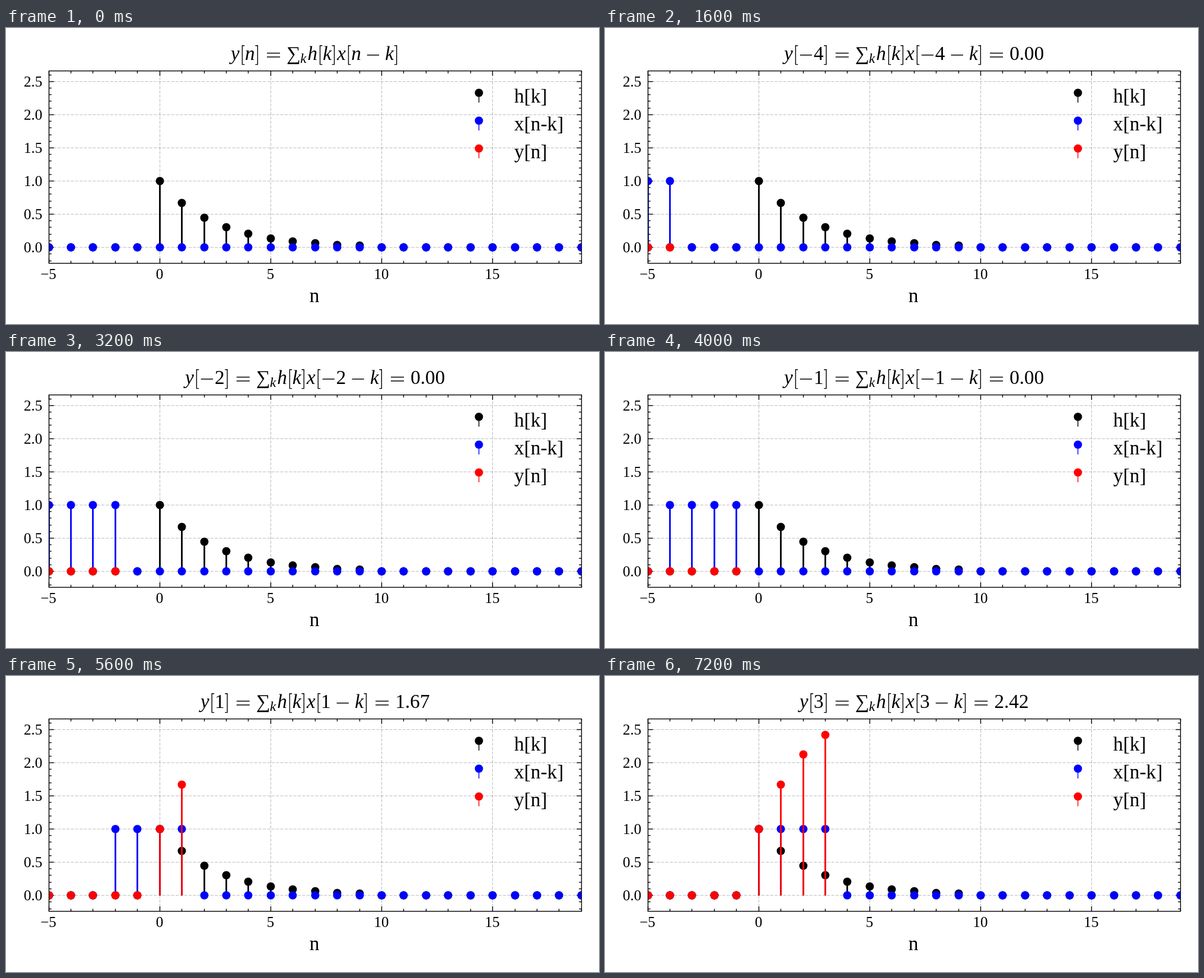
Animation of 1000x500 px, one loop 8 s. Source, as an HTML page:

```html
<!DOCTYPE html>
<html lang="en">
<head>
<meta charset="utf-8">
<title>Discrete convolution</title>
<style>
html, body { margin: 0; width: 100%; height: 100%; overflow: hidden; background: #fff; }
svg { display: block; width: 1000px; height: 500px; font-family: "Liberation Serif", "Times New Roman", serif; }
</style>
</head>
<body>
<svg id="stage" viewBox="0 0 1000 500"></svg>
<script>
const NS = "http://www.w3.org/2000/svg";
const stage = document.getElementById("stage");
const STEP = 800, STEPS = 10, FIRST = -5, LAST = 19;
const BOX = { left: 72.5, right: 970.5, top: 72.5, bottom: 397.5 };
const BLACK = "#000", BLUE = "#00f", RED = "#f00";

function add(parent, tag, attrs, text) {
  const node = document.createElementNS(NS, tag);
  for (const key in attrs) node.setAttribute(key, attrs[key]);
  if (text !== undefined) node.textContent = text;
  parent.appendChild(node);
  return node;
}
const line = (parent, x1, y1, x2, y2, stroke, width, more) =>
  add(parent, "line", { x1, y1, x2, y2, stroke, "stroke-width": width, ...more });
const label = (parent, x, y, size, text, more) =>
  add(parent, "text", { x, y, "font-size": size, ...more }, text);
const dot = (parent, x, y, fill) => add(parent, "circle", { cx: x, cy: y, r: 6.95, fill });

// Data coordinates snapped to pixel centres
const px = n => Math.floor(72.1 + 37.43 * (n - FIRST)) + 0.5;
const py = v => Math.floor(370.6 - 112.1 * v) + 0.5;

// Signals
const h = k => (k >= 0 && k < 10 ? Math.exp(-0.4 * k) : 0);
const x = m => (m >= 0 && m < 4 ? 1 : 0);
function y(n) {
  let sum = 0;
  for (let k = 0; k < 10; k++) sum += h(k) * x(n - k);
  return sum;
}

function stems(group, value, last, color) {
  group.replaceChildren();
  for (let n = FIRST; n <= last; n++)
    if (value(n) > 0) line(group, px(n), py(0), px(n), py(value(n)), color, 2.78);
  for (let n = FIRST; n <= last; n++) dot(group, px(n), py(value(n)), color);
}

function drawGrid() {
  const dash = { "stroke-dasharray": "5.14 2.22", "stroke-opacity": 0.25 };
  for (let n = 0; n <= 15; n += 5) line(stage, px(n), BOX.bottom, px(n), BOX.top, BLACK, 1.1, dash);
  for (let i = 0; i <= 5; i++) line(stage, BOX.left, py(i / 2), BOX.right, py(i / 2), BLACK, 1.1, dash);
}

function drawTicks() {
  for (let n = FIRST; n <= LAST; n++) {
    const major = n % 5 === 0, len = major ? 8.3 : 4.2;
    line(stage, px(n), BOX.bottom, px(n), BOX.bottom - len, BLACK, 1.39);
    line(stage, px(n), BOX.top, px(n), BOX.top + len, BLACK, 1.39);
    if (major) label(stage, px(n) - (n < 0 ? 1 : 0.5), 424, 25, String(n).replace("-", "\u2212"), { "text-anchor": "middle" });
  }
  for (let i = -2; i <= 26; i++) {
    const major = i % 5 === 0, len = major ? 8.3 : 4.2, at = py(i / 10);
    line(stage, BOX.left, at, BOX.left + len, at, BLACK, 1.39);
    line(stage, BOX.right, at, BOX.right - len, at, BLACK, 1.39);
    if (major && i >= 0) label(stage, 61.2, at + 8, 25, (i / 10).toFixed(1), { "text-anchor": "end" });
  }
}

function drawLegend() {
  [["h[k]", BLACK], ["x[n-k]", BLUE], ["y[n]", RED]].forEach(([text, color], i) => {
    const at = 109.5 + 47 * i;
    line(stage, 797.5, at, 797.5, at + 16.5, color, 1.39);
    dot(stage, 797.5, at, color);
    label(stage, 857, 125.5 + 47 * i, 33.33, text);
  });
}

// Title typesetting: advances in em
const EM = 33.2, BASE = 54;
const ADVANCE = { y: 0.444, k: 0.444, x: 0.444, h: 0.5, n: 0.5, "[": 0.278, "]": 0.278,
  "=": 1.334, "\u2212": 0.778, "~": 1.222, S: 0.64, _: 0.42, ".": 0.25 };
const advance = c => (ADVANCE[c] || 0.5) * EM;

function glyph(group, c, at) {
  const bar = (from, to, up) =>
    line(group, at + from * EM, BASE - up * EM, at + to * EM, BASE - up * EM, BLACK, 1.5);
  const italic = { "font-style": "italic" };
  if (c === "[" || c === "]") {
    const [stem, tip] = c === "[" ? [0.138, 0.255] : [0.14, 0.023];
    add(group, "path", {
      d: `M${at + tip * EM} ${BASE - 0.73 * EM}H${at + stem * EM}V${BASE + 0.23 * EM}H${at + tip * EM}`,
      fill: "none", stroke: BLACK, "stroke-width": 1.4
    });
  } else if (c === "=") {
    bar(0.334, 1, 0.347);
    bar(0.334, 1, 0.153);
  } else if (c === "\u2212") bar(0.083, 0.694, 0.25);
  else if (c === "~") bar(0.305, 0.916, 0.25);
  else if (c === "S") label(group, at, BASE, EM, "\u2211");
  else if (c === "_") label(group, at + 1.8, BASE + 5, EM * 0.7, "k", italic);
  else label(group, at, BASE, EM, c, /[a-z]/.test(c) ? italic : {});
}

function drawTitle(group, n) {
  const name = n === null ? "n" : String(n).replace("-", "\u2212");
  const result = n === null ? "" : "=" + y(n).toFixed(2);
  const chars = [..."y[" + name + "]=S_h[k]x[" + name + "~k]" + result];
  let at = 521.2 - chars.reduce((sum, c) => sum + advance(c), 0) / 2;
  group.replaceChildren();
  for (const c of chars) {
    glyph(group, c, at);
    at += advance(c);
  }
}

add(add(stage, "clipPath", { id: "plot" }), "rect",
  { x: BOX.left, y: BOX.top, width: BOX.right - BOX.left, height: BOX.bottom - BOX.top });
drawGrid();
drawTicks();
const plot = add(stage, "g", { "clip-path": "url(#plot)" });
const [hLayer, xLayer, yLayer] = [0, 1, 2].map(() => add(plot, "g", {}));
stems(hLayer, h, LAST, BLACK);
add(stage, "rect", { x: BOX.left, y: BOX.top, width: BOX.right - BOX.left, height: BOX.bottom - BOX.top,
  fill: "none", stroke: BLACK, "stroke-width": 1.39 });
drawLegend();
label(stage, 520, 463, 33.33, "n", { "text-anchor": "middle" });
const title = add(stage, "g", {});

let shown = -1;
function update(time) {
  const step = Math.floor(time / STEP) % STEPS;
  if (step === shown) return;
  shown = step;
  const n = step === 0 ? null : step - 6;
  stems(xLayer, k => (n === null ? 0 : x(n - k)), LAST, BLUE);
  stems(yLayer, y, n === null ? FIRST - 1 : n, RED);
  drawTitle(title, n);
}

const start = performance.now();
function tick() {
  update(performance.now() - start);
  requestAnimationFrame(tick);
}
tick();
</script>
</body>
</html>
```
